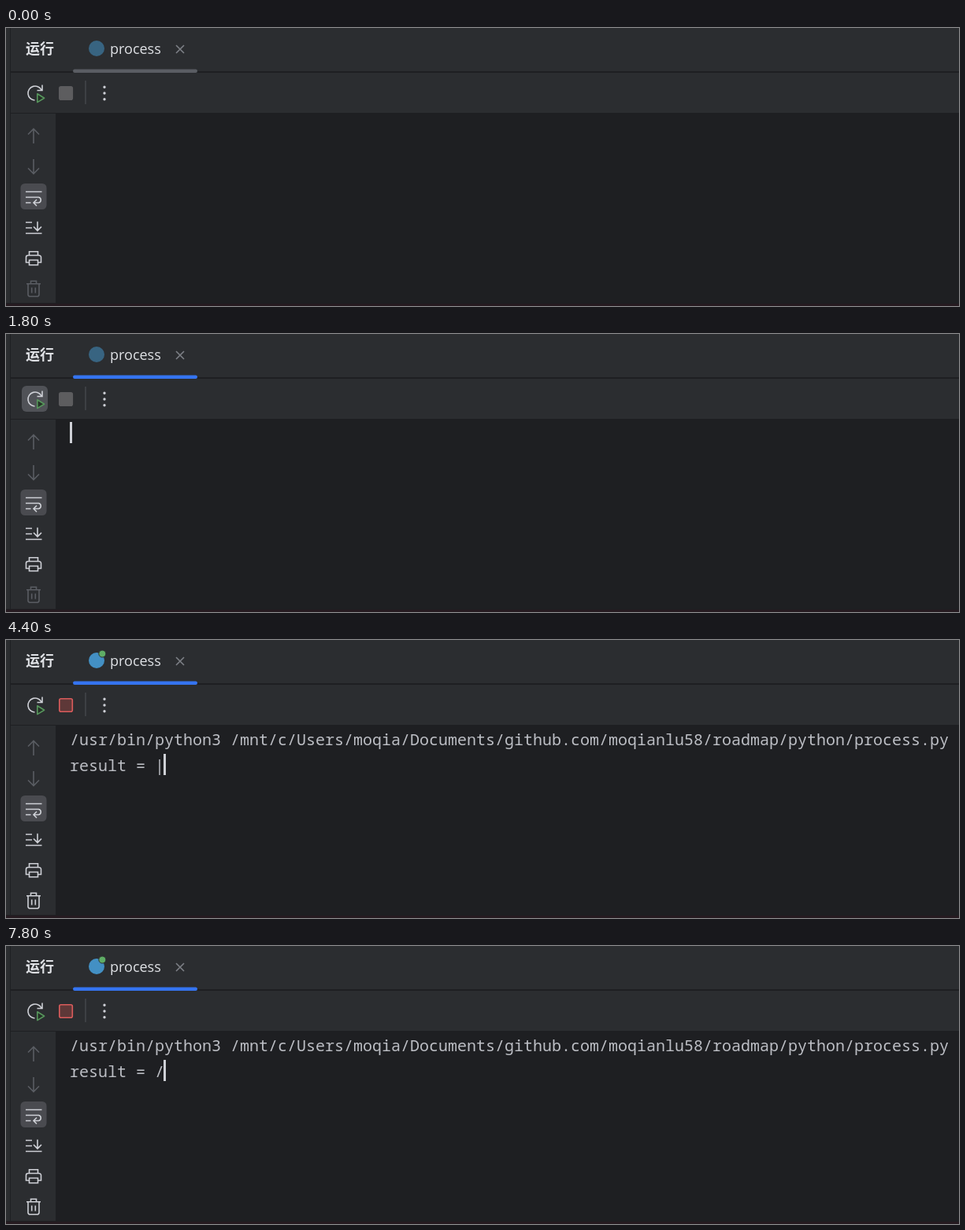
These frames come from a looping animation (1210 by 354 pixels, 8 s). An HTML page:

```html
<!DOCTYPE html>
<html lang="zh">
<head>
<meta charset="utf-8">
<style>
html, body { margin: 0; width: 100%; height: 100%; overflow: hidden; background: #1e1f22; }
svg { display: block; }
.icon { fill: none; stroke: #ced0d6; stroke-width: 1.6; }
.dim { stroke: #5a5d63; }
.ui { font: 18px "Open Sans", sans-serif; fill: #dfe1e5; }
.title { font: bold 18px "Noto Sans CJK SC", sans-serif; fill: #dfe1e5; }
.console { font: 20px "Noto Sans Mono", monospace; fill: #bcbec4; white-space: pre; font-variant-ligatures: none; }
</style>
</head>
<body>
<svg width="1210" height="354" viewBox="0 0 1210 354">
  <!-- panels -->
  <path fill="#2b2d30" d="M0 0H5V350H0ZM6 0H1210V55H6ZM6 57H1210V108H6ZM6 109H63V350H6Z"/>
  <path fill="#251a20" d="M0 351H1210V354H0Z"/>

  <!-- tab -->
  <text class="title" x="25" y="33">运行</text>
  <circle id="badge" cx="115" cy="26" r="10"/>
  <circle id="live" cx="122.3" cy="17.5" r="4.5" fill="#5fad65" stroke="#2b2d30"/>
  <text class="ui" x="132" y="33">process</text>
  <path class="icon" style="stroke:#7d8086" stroke-width="1.5" d="M216 22l10 10m0-10l-10 10"/>
  <rect id="underline" x="85" y="52.5" width="158" height="4.5" rx="2.2"/>

  <!-- toolbar -->
  <rect id="button" x="20" y="66" width="33" height="33" rx="6"/>
  <path class="icon" d="M36.5 92A9 9 0 1 1 45 79M46 72.5V79.5H39.5"/>
  <path id="play" stroke="#57965c" stroke-width="1.6" stroke-linejoin="round" d="M39.8 83.8L48.6 89.2L39.8 94.6Z"/>
  <rect id="stop" x="67.8" y="74.8" width="16.5" height="16.5" rx="2" stroke-width="1.6"/>
  <path stroke="#43454a" stroke-width="1.6" d="M101 67V97"/>
  <path stroke="#ced0d6" stroke-width="3.4" stroke-linecap="round" d="M125 75.3h0m0 7.7h0m0 7.7h0"/>

  <!-- side bar -->
  <path class="icon dim" d="M35 147V128.5M28 135.5l7-7 7 7M35 167V185.5M28 178.5l7 7 7-7"/>
  <rect x="18.5" y="198" width="33" height="33" rx="5.5" fill="#4a4b50"/>
  <path class="icon" d="M25 208.5H45.5M25 215.5H41.5a3.6 3.6 0 0 1 0 7H35.5M39 218.5l-4 4 4 4M25 222.5H31.5"/>
  <path class="icon" d="M25 247.5H33M25 254.5H33M25 261.5H45.5M40 246.5V258M35 253l5 5 5-5"/>
  <path class="icon" d="M29.5 289.5V284.8H40.5V289.5M29.5 298.5H25.5V292a2.5 2.5 0 0 1 2.5-2.5H42a2.5 2.5 0 0 1 2.5 2.5V298.5H40.5M29.5 295.5H40.5V301.8H29.5Z"/>
  <path id="trash" class="icon" d="M26 325.8H44M31.5 325.5V322.2H38.5V325.5M28 326V339.5a2.3 2.3 0 0 0 2.3 2.3H39.7a2.3 2.3 0 0 0 2.3-2.3V326M32.7 330.5V337.5M37.3 330.5V337.5"/>

  <!-- console -->
  <text id="command" class="console" x="81" y="134">/usr/bin/python3 /mnt/c/Users/moqia/Documents/github.com/moqianlu58/roadmap/python/process.py</text>
  <text id="result" class="console" x="81" y="167"></text>
  <rect id="caret" width="3" height="27" fill="#ced0d6"/>
</svg>
<script>
const LOOP = 8000, HOVER = 1300, PRESS = 1700, FOCUS = 1800, RELEASE = 1900, RUN = 2200, SPIN = 2400, STEP = 200;
const SPINNER = "-\\|/";
const el = id => document.getElementById(id);
const set = (id, attrs) => {
  for (const [name, value] of Object.entries(attrs)) el(id).setAttribute(name, value);
};

function draw(t) {
  const focused = t >= FOCUS, running = t >= RUN, spinning = t >= SPIN;
  const pressed = t >= PRESS && t < RELEASE;
  const hovered = t >= HOVER && !running;

  set("badge", { fill: running ? "#4390c4" : "#386481" });
  set("live", { visibility: running ? "visible" : "hidden" });
  set("underline", { fill: focused ? "#3574f0" : "#5a5d63" });
  set("button", { fill: pressed ? "#505257" : hovered ? "#3d3f43" : "none" });
  set("play", { fill: pressed ? "#253627" : "#253027" });
  set("stop", running ? { fill: "#5e3838", stroke: "#db5c5c" } : { fill: "#5d5d5f", stroke: "#5d5d5f" });
  set("trash", { class: running ? "icon" : "icon dim" });
  set("command", { visibility: running ? "visible" : "hidden" });
  set("caret", {
    x: spinning ? 200 : 81,
    y: running ? 145 : 112,
    visibility: focused ? "visible" : "hidden"
  });
  const frame = Math.floor((t - SPIN) / STEP) % SPINNER.length;
  el("result").textContent = spinning ? "result = " + SPINNER[frame] : "";
}

const start = performance.now();
function tick() {
  draw((performance.now() - start) % LOOP);
  requestAnimationFrame(tick);
}
tick();
</script>
</body>
</html>
```
